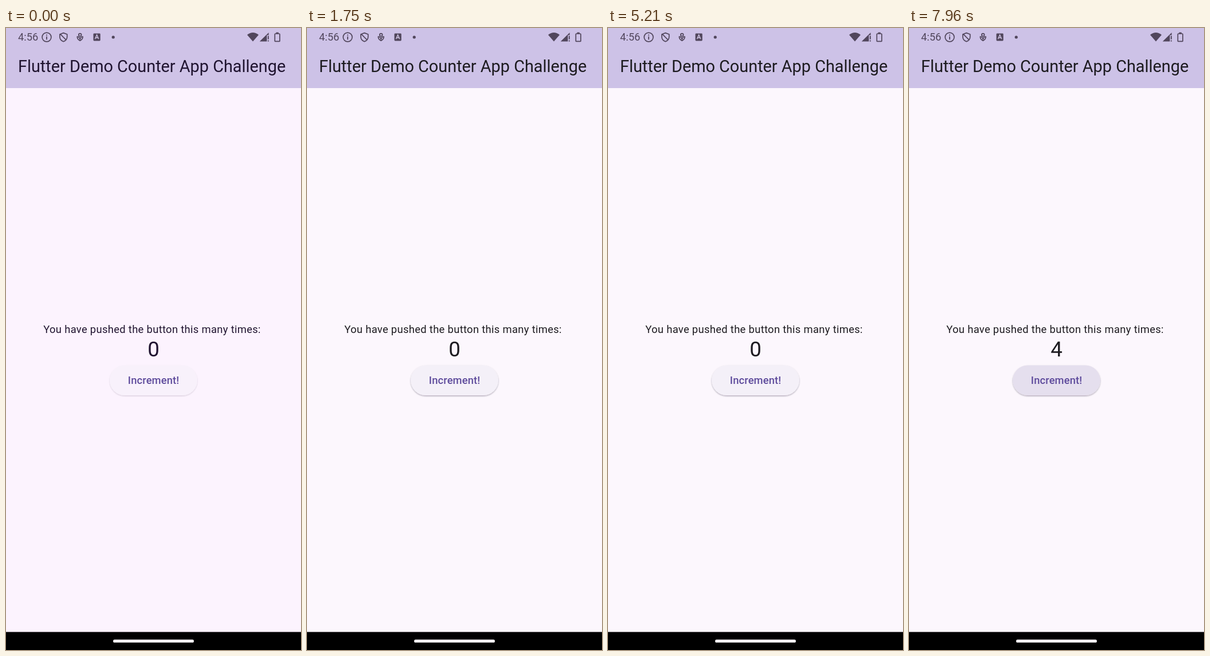
An HTML page for the animation above (8000 ms loop, 515 by 1087 pixels).

```html
<!DOCTYPE html>
<html lang="en">
<head>
<meta charset="utf-8">
<title>Counter</title>
<style>
  html, body { margin: 0; width: 100%; height: 100%; overflow: hidden; background: #fcf7fd; }
  svg { display: block; width: 515px; height: 1087px; }
  text { font-family: Roboto, "Noto Sans", sans-serif; fill: #1d1b20; }
  .line { fill: none; stroke: #51465c; stroke-width: 1.7; stroke-linejoin: round; }
</style>
</head>
<body>
<svg viewBox="0 0 515 1087">
  <defs>
    <clipPath id="pill"><rect x="181" y="589.5" width="153" height="52.5" rx="26.25"/></clipPath>
    <filter id="shadow" x="-10%" y="-20%" width="120%" height="150%">
      <feDropShadow dx="0" dy="1.3" stdDeviation="1.1" flood-color="#1a1028" flood-opacity=".34"/>
    </filter>
  </defs>

  <rect id="page" width="515" height="1087"/>
  <rect id="bar" width="515" height="105"/>

  <g fill="#51465c">
    <text x="21" y="22" font-size="18.3" style="fill:#51465c">4:56</text>
    <circle class="line" cx="71" cy="16" r="7.9"/>
    <path d="M70.1 14.8h1.8v5.4h-1.8zM70.1 11.4h1.8v1.9h-1.8z"/>
    <path class="line" d="M100.3 8.6l6.4 2.4v4.5q0 5.8-6.4 8.2q-6.4-2.4-6.4-8.2V11zM95 10.8L105 21"/>
    <g class="line" stroke-width="1.4">
      <circle cx="129.2" cy="12" r="2.4"/>
      <path d="M124.3 15.2q4.2.1 4.9 4.6q.7-4.5 4.9-4.6q-.2 4.6-4.9 7q-4.7-2.4-4.9-7z"/>
    </g>
    <rect x="152.5" y="9.6" width="12.2" height="12.8" rx="1.4"/>
    <path d="M155.4 19.2l3.2-7.2l3.2 7.2M156.6 17h4" fill="none" stroke="#d3c8e6" stroke-width="1.4"/>
    <circle cx="187.2" cy="16" r="2.6"/>
    <path d="M421 11.9q10-7.6 20 0L431 23.6z"/>
    <path d="M442.8 23.6L458.6 7.9v4.6h-3.2v11.1z"/>
    <path d="M456.9 13.8h1.9v6h-1.9zM456.9 21.6h1.9v2h-1.9z"/>
    <rect class="line" x="469.3" y="10" width="8.6" height="13.4" rx="1"/>
    <rect x="471.4" y="7.6" width="4.4" height="2.4"/>
  </g>

  <text class="ink" x="21" y="77.3" font-size="28.85">Flutter Demo Counter App Challenge</text>
  <text class="ink" x="65.3" y="533" font-size="18.36" letter-spacing=".328">You have pushed the button this many times:</text>
  <text id="count" class="ink" x="257.5" y="573.7" font-size="36.7" text-anchor="middle">0</text>

  <g id="button">
    <rect x="181" y="589.5" width="153" height="52.5" rx="26.25" fill="#f4f0f8" filter="url(#shadow)"/>
    <g clip-path="url(#pill)" fill="#65558f">
      <rect id="highlight" x="181" y="589" width="153" height="54"/>
      <circle id="ripple" cx="257.5" cy="616"/>
    </g>
  </g>
  <text x="257.6" y="622.3" font-size="18.36" font-weight="500" letter-spacing=".131" text-anchor="middle" style="fill:#5e4b9c">Increment!</text>

  <rect y="1055.5" width="515" height="31.5"/>
  <rect x="187" y="1068.8" width="141" height="5.2" rx="2.6" fill="#f5f1f5"/>
</svg>
<script>
  const DURATION = 8000;
  const PRESSES = [5400, 6350, 7080, 7760];
  const get = id => document.getElementById(id);
  const inks = document.querySelectorAll(".ink");

  const clamp = v => Math.max(0, Math.min(1, v));
  const progress = (t, from, to) => clamp((t - from) / (to - from));
  const mix = (a, b, p) => `rgb(${a.map((v, i) => Math.round(v + (b[i] - v) * p))})`;

  function render(t) {
    // The picture settles to its final tones shortly after the start.
    const settle = progress(t, 0, 420);
    get("page").setAttribute("fill", mix([252, 243, 254], [252, 247, 253], settle));
    get("bar").setAttribute("fill", mix([207, 195, 231], [205, 194, 231], settle));
    get("button").setAttribute("opacity", 0.45 + 0.55 * settle);
    inks.forEach(el => el.style.fill = mix([32, 20, 48], [29, 27, 32], settle));

    const pressed = PRESSES.filter(at => t >= at);
    get("count").textContent = pressed.length;

    const age = pressed.length ? t - pressed[pressed.length - 1] : DURATION;
    const spread = 1 - (1 - progress(age, 0, 200)) ** 2;
    const fade = 1 - progress(age, 240, 520);
    get("highlight").setAttribute("opacity", 0.04 * progress(age, 0, 80) * fade);
    get("ripple").setAttribute("r", 20 + 65 * spread);
    get("ripple").setAttribute("opacity", 0.065 * progress(age, 0, 60) * fade);
  }

  const start = performance.now();
  function tick() {
    render((performance.now() - start) % DURATION);
    requestAnimationFrame(tick);
  }
  tick();
</script>
</body>
</html>
```
